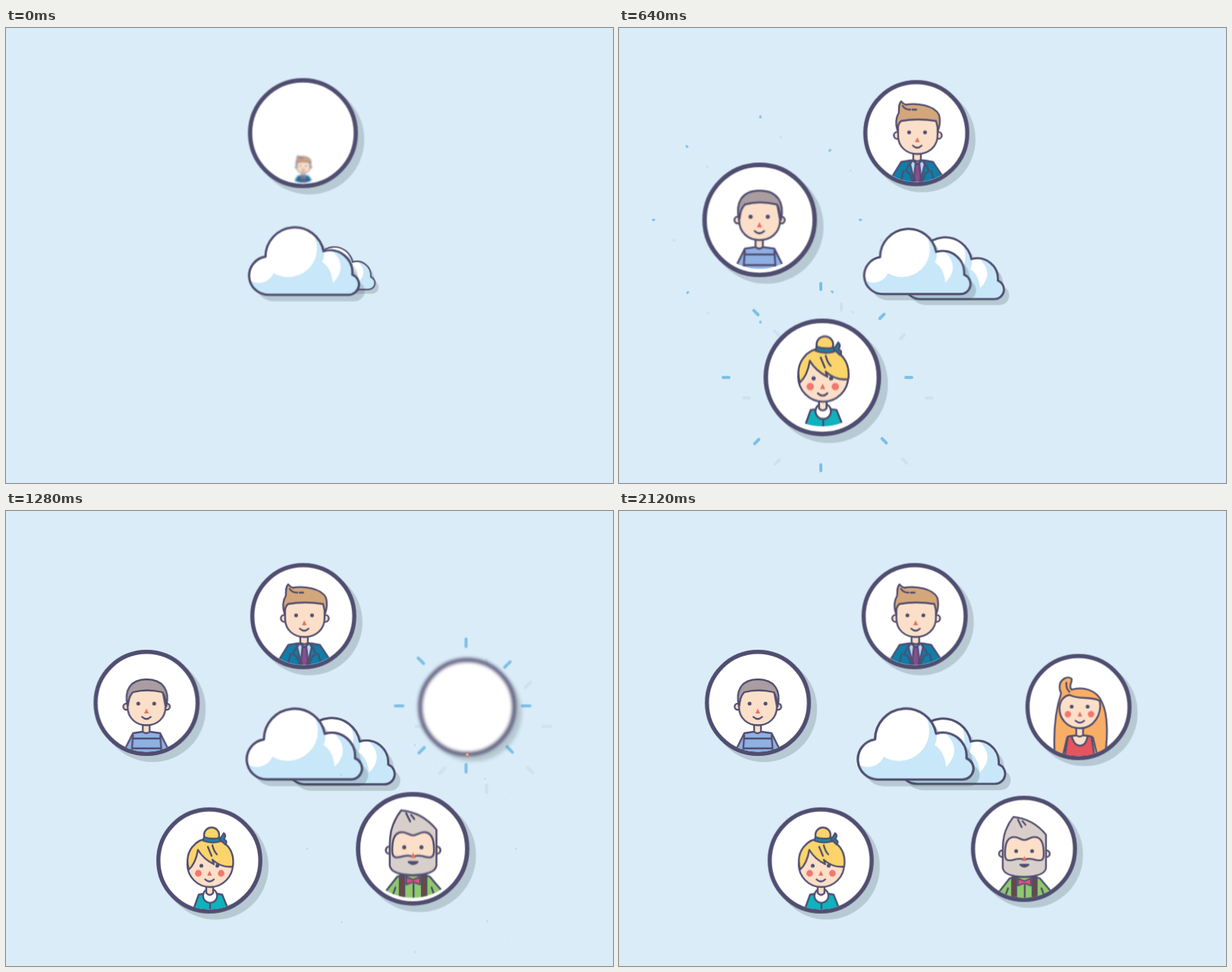
Recreate the animation shown at these times as an HTML page without scripts. Size 800 px wide and 600 px high, loop 2.16 s.

```html
<!DOCTYPE html>
<html lang="en">
<head>
<meta charset="utf-8">
<title>People around a cloud</title>
<style>
html, body { margin: 0; width: 100%; height: 100%; overflow: hidden; background: #daecf8; }
svg { display: block; width: 100vw; height: 100vh; }

.ink, .face { stroke: #504e70; stroke-width: 2.3; stroke-linejoin: round; stroke-linecap: round; }
.line { fill: none; }
.shade { fill: rgba(60, 80, 80, .22); stroke: none; }
.skin { fill: #fbdfc9; }
.nose { fill: #e8705c; stroke: none; }
.cheek { fill: #f0786f; stroke: none; }
.dot { fill: #504e70; stroke: none; }

.scene, .front, .back, .bubble, .disc, .face, .rays {
  animation-duration: 2160ms;
  animation-iteration-count: infinite;
  animation-timing-function: linear;
}
.scene { animation-name: drift; animation-timing-function: ease-in-out; }
.front { animation-name: front; animation-timing-function: ease-in-out; }
.back { animation-name: back; animation-timing-function: ease-in-out; }
.disc { animation-name: disc; animation-delay: var(--s); }
.face { animation-name: face; animation-delay: var(--s); transform-origin: 0 66px; }
.rays {
  animation-name: rays; animation-delay: var(--s);
  fill: none; stroke: #7cbfe7; stroke-width: 4; stroke-linecap: round;
  filter: drop-shadow(27px 27px 0 rgba(60, 80, 80, .07));
}
.first .disc { animation-name: disc-first; }
.first .face { animation-name: face-first; }
.b2 { animation-name: show2; }
.b3 { animation-name: show3; }
.b4 { animation-name: show4; }
.b5 { animation-name: show5; }

@keyframes show2 { 0%, 11.1% { opacity: 0 } 11.11%, 100% { opacity: 1 } }
@keyframes show3 { 0%, 17.58% { opacity: 0 } 17.59%, 100% { opacity: 1 } }
@keyframes show4 { 0%, 38.65% { opacity: 0 } 38.66%, 100% { opacity: 1 } }
@keyframes show5 { 0%, 56.24% { opacity: 0 } 56.25%, 100% { opacity: 1 } }

@keyframes drift {
  0% { transform: translate(-.5px, 0) }
  18.5% { transform: translate(0, -1px) }
  40.7% { transform: translate(0, 1px) }
  59.3% { transform: translate(0, 0) }
  72.2% { transform: translate(-.8px, -.5px) }
  87% { transform: translate(-3.2px, 0) }
  98%, 100% { transform: translate(-2.2px, 0) }
}
@keyframes front {
  0% { transform: scale(.95); filter: blur(.8px) }
  5.5% { transform: scale(1.03); filter: blur(0) }
  18.5% { transform: translateY(1px) scale(.88) }
  40.7% { transform: scale(.958) }
  59.3% { transform: scale(.997) }
  72.2% { transform: scale(1.005) }
  87%, 100% { transform: scale(1); filter: blur(0) }
}
@keyframes back {
  0% { transform: scale(.6) }
  18.5% { transform: scale(.84) }
  40.7% { transform: scale(.9) }
  59.3% { transform: scale(.935) }
  72.2%, 100% { transform: scale(.92) }
}
@keyframes disc {
  0% { transform: scale(0); filter: blur(16px) }
  .93% { transform: scale(.17); filter: blur(15px) }
  2.1% { transform: scale(.9); filter: blur(3px) }
  3% { transform: scale(.92); filter: blur(2.6px) }
  7.4% { transform: scale(1.14); filter: blur(0) }
  15.7%, 23.2% { transform: scale(var(--r)) }
  31.5%, 100% { transform: scale(1); filter: blur(0) }
}
@keyframes disc-first {
  0% { transform: scale(1.035); filter: blur(.7px) }
  3.5% { transform: scale(1.14); filter: blur(0) }
  11.8%, 19.2% { transform: scale(1.06) }
  27.8%, 100% { transform: scale(1); filter: blur(0) }
}
@keyframes face {
  0%, 2% { transform: scale(0); filter: blur(2px) }
  3% { transform: scale(.04) }
  3.94% { transform: scale(.33); filter: blur(3px) }
  7.4% { transform: scale(.92); filter: blur(1.1px) }
  11% { transform: scale(1.1); filter: blur(0) }
  15.7%, 23.2% { transform: scale(var(--p)) }
  31.5%, 100% { transform: scale(1); filter: blur(0) }
}
@keyframes face-first {
  0% { transform: scale(.33); filter: blur(3px) }
  3.5% { transform: scale(.92); filter: blur(1.1px) }
  7% { transform: scale(1.1); filter: blur(0) }
  11.8%, 19.2% { transform: scale(1.08) }
  27.8%, 100% { transform: scale(1); filter: blur(0) }
}
@keyframes rays {
  0%, 1.2% { opacity: 0; stroke-dasharray: 1 300; stroke-dashoffset: -20 }
  1.6% { opacity: 1 }
  2.1% { stroke-dasharray: 4 300; stroke-dashoffset: -24 }
  3% { stroke-dasharray: 10 300; stroke-dashoffset: -38 }
  7.4% { stroke-dasharray: 13 300; stroke-dashoffset: -52 }
  15.7% { stroke-dasharray: 4 300; stroke-dashoffset: -94.5; stroke-width: 4 }
  18.5% { stroke-dasharray: 1.5 300; stroke-dashoffset: -95; stroke-width: 2.8; opacity: 1 }
  22.5%, 100% { stroke-dasharray: .1 300; stroke-dashoffset: -98; stroke-width: 1; opacity: 0 }
}
</style>
</head>
<body>
<svg viewBox="0 0 800 600">
<defs>
  <clipPath id="round"><circle r="64.6"/></clipPath>
  <path id="shape" d="M-49 46.5A26.65 26.65 0 0 1-53.5-6.5A40.6 40.6 0 0 1 27-14A31 31 0 0 1 67 18.5A14.5 14.5 0 0 1 61.5 46.5Z"/>
  <clipPath id="inside"><use href="#shape"/></clipPath>
  <g id="cloud">
    <use href="#shape" class="shade" x="8" y="9"/>
    <use href="#shape" fill="#c8e7f8"/>
    <g clip-path="url(#inside)" fill="#fff">
      <circle cx="-22" cy="-18" r="40"/>
      <circle cx="-63" cy="7" r="23"/>
      <path d="M26-16L40-14Q62 8 40 30Q38 9 25 1Q30-8 26-16Z"/>
    </g>
    <use href="#shape" class="ink line" style="stroke-width:3.2"/>
  </g>
  <g id="plate">
    <circle cx="8" cy="8" r="70" class="shade"/>
    <circle r="67.2" fill="#fff" stroke="#504e70" stroke-width="5.4"/>
  </g>
  <path id="burst" d="M0-40V-160M0 39V160M36 0H160M-45 0H-160M-29-29L-113-113M24-24L113-113M27 27L113 113M-28 28L-113 113"/>
  <g id="look">
    <circle cx="-10.5" r="2.5" class="dot"/>
    <circle cx="10.5" r="2.5" class="dot"/>
    <path class="nose" d="M.3 6.5L3.4 13H-2.8Z"/>
  </g>
  <path id="smile" class="line" d="M-5.5 17Q.3 22.5 6 17"/>
</defs>

<g class="scene">
  <g transform="translate(441 317)"><g class="back"><use href="#cloud"/></g></g>
  <g transform="translate(393.2 307.6)"><g class="front"><use href="#cloud"/></g></g>

  <!-- man in a suit -->
  <g class="bubble first" transform="translate(391.8 138.6)" style="--s:0ms">
    <use href="#burst" class="rays" y="-7"/>
    <g class="disc"><use href="#plate"/></g>
    <g class="face"><g clip-path="url(#round)">
      <path fill="#0f7ea8" d="M-8 36L-20 38L-36 64V70H38V62L22 38L11 36Z"/>
      <path fill="#bcd7f5" d="M-5 36H8L11 41L4 70H-1L-8 41Z"/>
      <path fill="#8a4d92" d="M-1 40H4L6 58L3 70H0L-3 58Z"/>
      <path class="line" d="M-5 36L1.5 41L8 36M-8 39L-14 50L-9 53L-3 68M11 39L17 50L12 53L6 68M-17 50L-21 66M20 50L24 66"/>
      <path class="skin" d="M-4 24V35Q1.5 39 6 35V24Z"/>
      <circle class="skin" cx="-25" cy="3" r="4.6"/>
      <circle class="skin" cx="29" cy="3" r="4.6"/>
      <path class="skin" d="M-24-24V3C-24 19-12 27.5 1.5 27.5C16 27.5 28 18 28 3V-24Z"/>
      <path fill="#d4a67c" d="M-25-4C-28-14-26-22-23-27C-23-34-23-39-20-42C-18-40-16-38-14-37.5C0-40 24-37 30-24C32-16 31-10 29-4L26-16Q2-20-20-16Q-24-13-25-4Z"/>
      <path class="line" d="M-18-36Q-15-31-8-31M-5-31H0"/>
      <use href="#look" x="1" y="-1"/><use href="#smile" x="1" y="-.5"/>
    </g></g>
  </g>

  <!-- man in stripes -->
  <g class="bubble b2" transform="translate(185.3 253)" style="--s:240ms;--r:1.08;--p:1.08">
    <use href="#burst" class="rays" x="1"/>
    <g class="disc"><use href="#plate"/></g>
    <g class="face"><g clip-path="url(#round)">
      <path fill="#8fb0e2" d="M-5 38L-18 40L-31 66V70H31V66L18 40L4 38Z"/>
      <path class="line" d="M-18 47H18M-18 60H18M-18 43L-20 70M18 43L20 70"/>
      <path class="skin" d="M-5 27V38Q-.5 42 4 38V27Z"/>
      <circle class="skin" cx="-26.5" cy="5" r="4.2"/>
      <circle class="skin" cx="26.5" cy="5" r="4.2"/>
      <path class="skin" d="M-25 5C-25 21-13 29.5 0 29.5C13 29.5 25 21 25 5L20-22H-20Z"/>
      <path fill="#aa9da1" d="M-25 5C-30-16-22-31 0-31C22-31 31-16 26 5Q25-8 21-14Q0-19-18-14Q-24-8-25 5Z"/>
      <use href="#look" x="-.5" y="1"/><use href="#smile" x="-.5" y="1.5"/>
    </g></g>
  </g>

  <!-- woman with a bun -->
  <g class="bubble b3" transform="translate(268 460.8)" style="--s:380ms;--r:1.085;--p:1.1">
    <use href="#burst" class="rays" x="-2"/>
    <g class="disc"><use href="#plate"/></g>
    <g class="face"><g clip-path="url(#round)">
      <path fill="#0fb2bd" d="M-8 44L-14 45L-23 70H27L17 45L11 44Z"/>
      <path class="line" d="M1 56V70"/>
      <circle cx="1" cy="46.5" r="9.3" fill="#fff"/>
      <path class="skin" d="M-4 32V43Q.5 48 5 43V32Z"/>
      <circle class="skin" cx="1" cy="5" r="30"/>
      <circle cx="3" cy="-33.5" r="10" fill="#fbd56b"/>
      <path fill="#fbd56b" d="M-27 12C-34-12-18-29 1-29C22-29 34-12 31 8Q16 10 4-1L6 5Q-8-2-15-14Q-18 4-27 12Z"/>
      <path class="line" d="M-2-18L3-6M4-20Q6-12 10-8"/>
      <path fill="#1c86a8" d="M-7-31Q3-27 14-30V-25Q3-22-8-26ZM14-28L19-36Q23-33 19-28Q25-25 21-21Z"/>
      <circle class="cheek" cx="-14.5" cy="17" r="4.4"/>
      <circle class="cheek" cx="15.5" cy="17" r="4.4"/>
      <use href="#look" y="7"/><use href="#smile" y="8"/>
    </g></g>
  </g>

  <!-- bearded man -->
  <g class="bubble b4" transform="translate(535.9 445.5)" style="--s:835ms;--r:1.07;--p:1.08">
    <use href="#burst" class="rays" x="3"/>
    <g class="disc"><use href="#plate"/></g>
    <g class="face"><g clip-path="url(#round)">
      <path fill="#8fc96b" d="M-14 37L-19 39L-37 62V70H39V60L21 39L16 37Z"/>
      <path fill="#6b4a3e" stroke-width="1.8" d="M-16 38H-10V70H-16ZM11 38H17V70H11Z"/>
      <path class="line" d="M1 48V70M-21 52L-26 66M23 52L28 66"/>
      <path fill="#e04f83" stroke-width="1.8" d="M-8 39L.5 42.5L9 39V48.5L.5 45.5L-8 48.5Z"/>
      <g transform="translate(0 1.4)">
        <circle class="skin" cx="-28.5" cy="5" r="4.4"/>
        <circle class="skin" cx="29.5" cy="5" r="4.4"/>
        <path fill="#d9cfca" d="M-28 8C-28-6-28-16-24-26Q-20-36-14-43.5Q12-41 29-20V24Q27 35 0 35.5Q-26 35-28 24Z"/>
        <path class="skin" d="M-25 6C-25-4-24-17-13-17C-7-17-4-13 .5-13C5-13 8-17 14-17C25-17 26-4 26 6C26 18 17 13 10 12Q5 11 .5 13Q-4 11-9 12C-16 13-25 18-25 6Z"/>
        <path class="line" d="M-8-40L-3-30M-2-38L2-33"/>
        <use href="#look" x=".2" y="1.5"/>
        <path fill="#504e70" d="M-5 19.5Q.5 25 6 19.5Z"/>
      </g>
    </g></g>
  </g>

  <!-- woman with long hair -->
  <g class="bubble b5" transform="translate(607.8 258.5)" style="--s:1215ms;--r:1.1;--p:1.045">
    <use href="#burst" class="rays" x="-1.5" y="-1.5"/>
    <g class="disc"><use href="#plate"/></g>
    <g class="face"><g clip-path="url(#round)">
      <path fill="#f9ae66" d="M-23-18C-29 0-34 30-31 70H34C39 40 39 10 31-6C24-24 4-27-9-23C-14-27-8-33-9-37C-13-42-25-37-25-27C-25-23-24-20-23-18Z"/>
      <path class="skin" d="M-22 70L-15 40Q2 34 19 40L26 70Z"/>
      <path fill="#e4555f" d="M-19 70L-14 39L-9 38Q-6 51 2 51Q10 51 12 38L17 39L22 70Z"/>
      <path class="skin" d="M-3 25V37Q1.5 41 6 37V25Z"/>
      <path class="skin" d="M-25 0C-24-10-18-15-12-16C0-9 18-15 28-8C31 10 20 28 2 28C-16 28-26 14-25 0Z"/>
      <path class="line" d="M-16-32Q-17-25-12-20"/>
      <circle class="cheek" cx="-14" cy="9.5" r="4.2"/>
      <circle class="cheek" cx="16.5" cy="9.5" r="4.2"/>
      <use href="#look" x="1.5" y="-.5"/><use href="#smile" x="1.5" y="1"/>
    </g></g>
  </g>
</g>
</svg>
</body>
</html>
```
